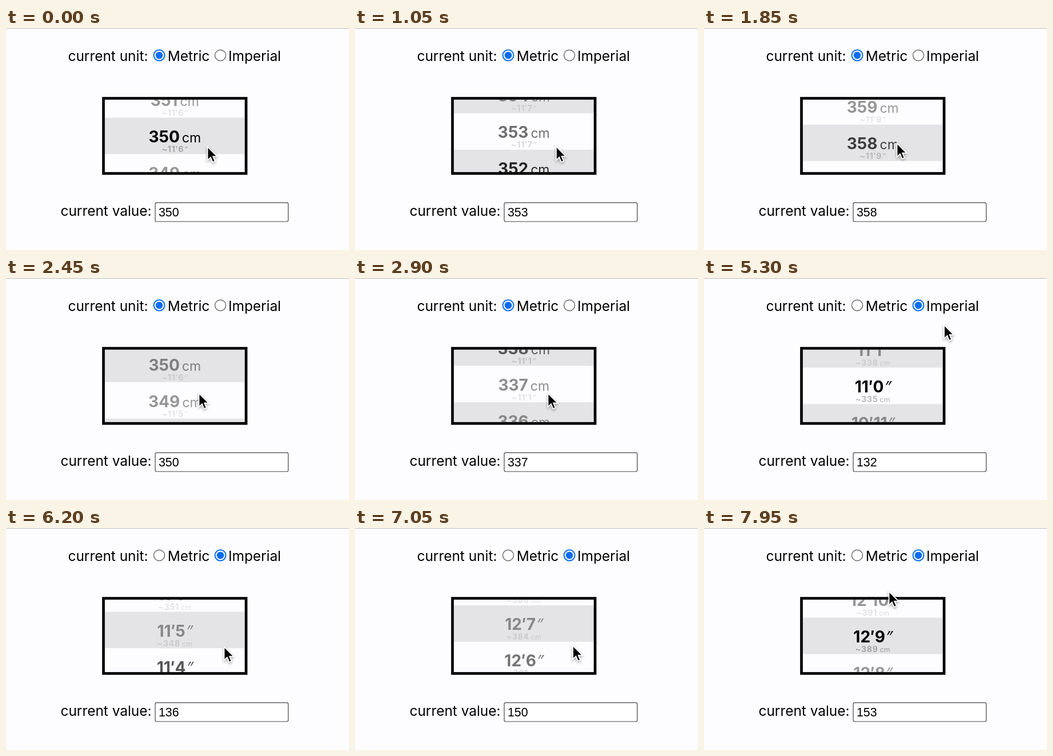
Recreate the animation shown at these times as an HTML page. Size 600 by 390 pixels, loop 8 s.

```html
<!DOCTYPE html>
<html lang="en">
<head>
<meta charset="utf-8">
<title>Unit picker</title>
<style>
  html, body { margin: 0; width: 100%; height: 100%; overflow: hidden; background: #fdfcfe; }
  svg { display: block; font-family: Inter, sans-serif; font-optical-sizing: none; }
  .label { font-size: 24.4px; }
  .row { text-anchor: middle; }
  .main { font-size: 28px; font-weight: 700; }
  .main .unit { font-size: 23px; font-weight: 400; }
  .sub { font-size: 14px; font-weight: 700; letter-spacing: .8px; opacity: .27; }
  .sub .unit { font-size: 12px; font-weight: 500; letter-spacing: .3px; }
  .inch { font-family: "Noto Sans", sans-serif; font-style: italic; font-weight: 500; }
  .value { font: 21.33px "Liberation Sans", Arial, sans-serif; }
  .ring { fill: #fff; stroke: #707070; stroke-width: 1.5; }
  .on .ring { stroke: #0a6cf5; stroke-width: 2; }
  .dot { fill: #0a6cf5; visibility: hidden; }
  .on .dot { visibility: visible; }
  .beam path { fill: none; stroke: #000; stroke-width: 2; }
  .beam path:first-child { stroke: #fff; stroke-width: 4.5; }
  #arrow { filter: drop-shadow(0 2px 2px rgba(0, 0, 0, .35)); }
</style>
</head>
<body>
<svg width="600" height="390" viewBox="0 0 600 390">
  <defs>
    <clipPath id="inside"><rect x="173" y="126" width="244.5" height="127.5"/></clipPath>
  </defs>
  <rect width="600" height="390" fill="#fdfcfe"/>
  <rect width="600" height="1" fill="#b9b9bb"/>

  <g class="label">
    <text x="108.5" y="58">current unit:</text>
    <text x="282.8" y="58">Metric</text>
    <text x="389" y="58">Imperial</text>
    <text x="95.5" y="330">current value:</text>
  </g>
  <g id="metric" transform="translate(268 48)"><circle class="ring" r="9.5"/><circle class="dot" r="6.3"/></g>
  <g id="imperial" transform="translate(375 48)"><circle class="ring" r="9.5"/><circle class="dot" r="6.3"/></g>

  <g id="rows" clip-path="url(#inside)"></g>
  <rect x="170.5" y="123.5" width="249.5" height="132" fill="none" stroke="#000" stroke-width="4.7"/>

  <rect x="261" y="306.8" width="232.7" height="33.2" rx="2.5" fill="#fff" stroke="#444" stroke-width="1.2"/>
  <text id="value" class="value" x="267" y="330.5"></text>

  <g id="cursor">
    <path id="arrow" d="M0 0V24L5.4 18.8L9 27.4L13.2 25.6L9.6 17.2H17Z" stroke="#fff" stroke-width="1.8"/>
    <g id="beam" class="beam"></g>
  </g>
</svg>
<script>
const LOOP = 8000, STEP = 50;
const ROW = 64, TOP = 157.5, CENTER = 295.3;
const SWITCH = 4800;          // Imperial gets selected
const LAG = 25, FADE = 150;   // active row follows the scroll, then fades
const $ = id => document.getElementById(id);

// time, value at the centre, speed in rows per second
const metricScroll = [
  [200, 350, 0], [1850, 358.19, 6.6], [2000, 358.7, 0],
  [2900, 336.95, -14], [3300, 335, 0]
];
const imperialScroll = [
  [5700, 132, 0], [6200, 136.84, 15], [7050, 150.66, 20], [7400, 153, 0]
];
// time, x, y
const pointer = [
  [1000, 352, 208], [1400, 337, 202], [3950, 337, 202], [4250, 400, 120],
  [4550, 452, 19], [4750, 438, 40], [5150, 433, 38], [5600, 381, 208],
  [6200, 381, 208], [7050, 380.5, 206], [7680, 380.5, 206], [7930, 323, 111]
];

const beamPath = "M-5.5-12.5Q0-13 0-8.5Q0-13 5.5-12.5M0-9V9M-5.5 12.5Q0 13 0 8.5Q0 13 5.5 12.5M-3.5 4.5H3.5";
$("beam").innerHTML = `<path d="${beamPath}"/>`.repeat(2);

// Finds the two keys around t and the progress between them.
function between(keys, t) {
  let i = keys.findIndex(k => k[0] > t);
  if (i < 0) return [keys.at(-1), keys.at(-1), 0];
  if (i === 0) return [keys[0], keys[0], 0];
  const a = keys[i - 1], b = keys[i];
  return [a, b, (t - a[0]) / (b[0] - a[0])];
}

function scrollAt(t, keys) {
  const [a, b, u] = between(keys, t);
  const seconds = (b[0] - a[0]) / 1000, w = 1 - u;
  return a[1] * w * w * (1 + 2 * u) + b[1] * u * u * (3 - 2 * u)
    + seconds * u * w * (a[2] * w - b[2] * u);
}

function pointerAt(t) {
  const [a, b, u] = between(pointer, t);
  const s = u * u * (3 - 2 * u);
  return [1, 2].map(i => a[i] + (b[i] - a[i]) * s);
}

const feet = inches => `${Math.floor(inches / 12)}′${inches % 12}<tspan class="inch" dx=".05em">″</tspan>`;
const cm = (n, gap) => `${n}<tspan class="unit" dx="${gap}">cm</tspan>`;

function rowMarkup(value, y, opacity, imperial) {
  const main = imperial ? feet(value) : cm(value, 4);
  const sub = "~" + (imperial ? cm(Math.round(value * 2.54), 3) : feet(Math.round(value / 2.54)));
  const shaded = value % 2 === (imperial ? 1 : 0);
  return `<g transform="translate(0 ${y})">
    ${shaded ? `<rect x="173" width="245" height="${ROW}" fill="#e4e3e5"/>` : ""}
    <g class="row" opacity="${opacity}">
      <text class="main" x="${CENTER}" y="43.5">${main}</text>
      <text class="sub" x="${CENTER}" y="60.5">${sub}</text>
    </g></g>`;
}

function draw(t) {
  const imperial = t >= SWITCH;
  const keys = imperial ? imperialScroll : metricScroll;
  const position = scrollAt(t, keys);
  const activeAt = time => Math.round(scrollAt(time - LAG, keys));

  // Share of the fade time during which a row was the active one.
  const samples = 30, share = {};
  for (let i = 0; i < samples; i++) {
    const v = activeAt(t - (i + .5) * FADE / samples);
    share[v] = (share[v] || 0) + 1 / samples;
  }

  let markup = "";
  const middle = Math.round(position);
  for (let v = middle + 2; v >= middle - 2; v--) {
    markup += rowMarkup(v, TOP + (position - v) * ROW, .4 + .6 * (share[v] || 0), imperial);
  }
  $("rows").innerHTML = markup;
  $("value").textContent = activeAt(t);
  $("metric").classList.toggle("on", !imperial);
  $("imperial").classList.toggle("on", imperial);

  const [x, y] = pointerAt(t);
  const textCursor = t >= 3350 && t < 4000;
  $("cursor").setAttribute("transform", `translate(${x + .5} ${y + .5})`);
  $("arrow").style.display = textCursor ? "none" : "";
  $("beam").style.display = textCursor ? "" : "none";
}

const start = performance.now();
function frame() {
  const t = (performance.now() - start) % LOOP;
  draw(Math.floor(t / STEP) * STEP);
  requestAnimationFrame(frame);
}
frame();
</script>
</body>
</html>
```
